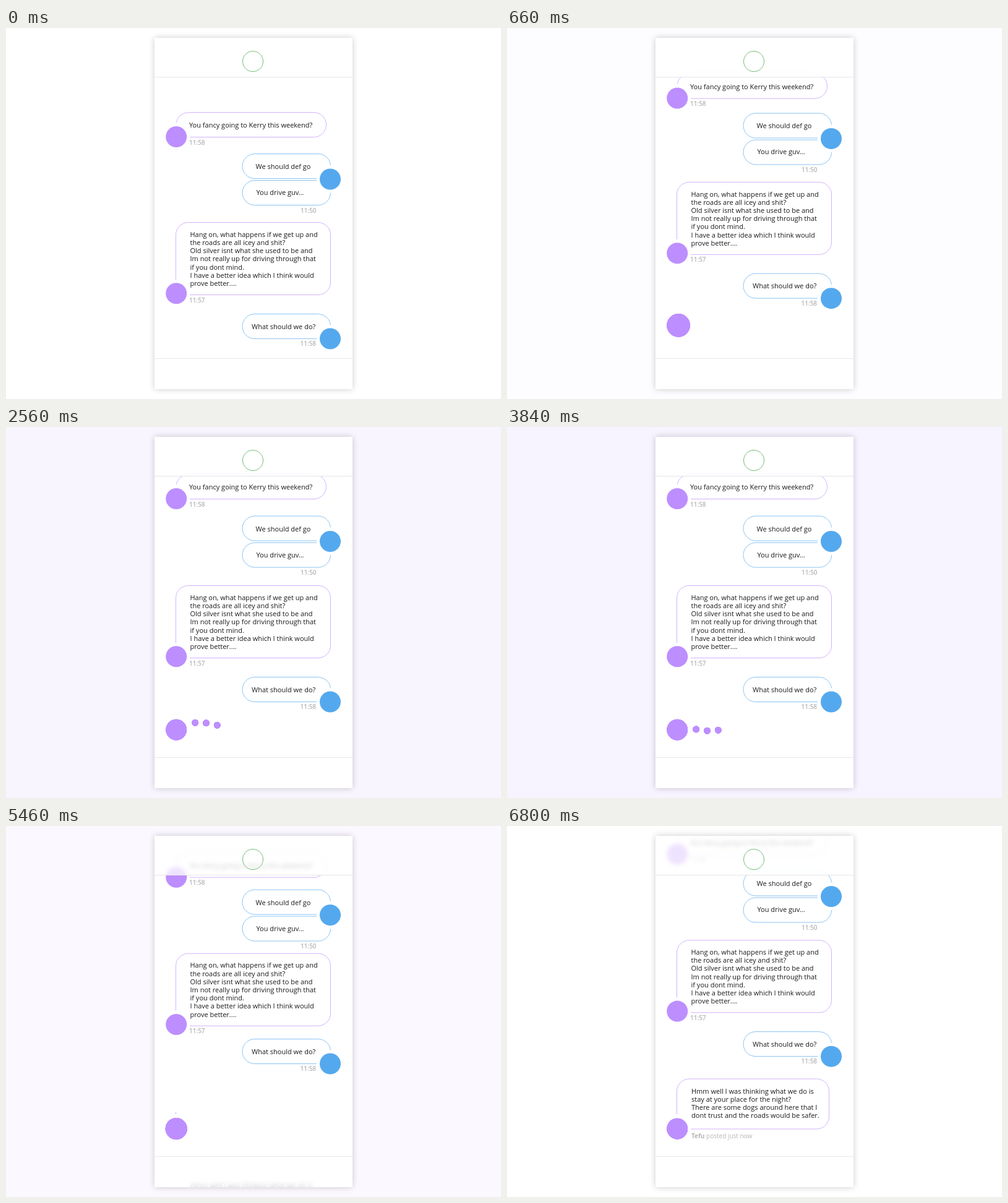
An HTML page for the animation above (6920 ms loop, 800 px wide and 600 px high).

```html
<!DOCTYPE html>
<html lang="en">
<head>
<meta charset="utf-8">
<title>Chat typing indicator</title>
<style>
  html, body { margin: 0; width: 100%; height: 100%; overflow: hidden; background: #fff; }
  .card {
    position: absolute; left: 240px; top: 16px; width: 320px; height: 568px;
    overflow: hidden; background: #fff;
  }
  .shadow {
    position: absolute; left: 240px; top: 16px; width: 320px; height: 568px;
    box-shadow: 0 0 10px rgba(0, 0, 0, .2);
  }
  svg { position: absolute; left: -240px; top: -16px; }
  .bar {
    position: absolute; left: 0; width: 320px; box-sizing: border-box;
    background: rgba(255, 255, 255, .75); backdrop-filter: blur(3.5px);
  }
  .head { top: 0; height: 64px; border-bottom: 1px solid #e6e6e6; }
  .foot { top: 518px; height: 50px; border-top: 1px solid #e6e6e6; }
  .badge {
    position: absolute; left: 142px; top: 21px; width: 34px; height: 34px;
    box-sizing: border-box; border: 1px solid #72bd75; border-radius: 50%;
  }
  text { font: 11px "Open Sans", "Noto Sans", sans-serif; fill: #1a1a1a; }
  .time { font-size: 10px; font-weight: 600; fill: #b5b5b5; }
  .note { font-size: 10px; fill: #b5b5b5; }
  .note tspan { font-weight: 700; }
  path { fill: none; stroke-width: .68; }
  .her path { stroke: #bd8eff; }
  .him path { stroke: #54a9ee; }
  .her circle { fill: #bd8eff; }
  .him circle { fill: #54a9ee; }
</style>
</head>
<body>
<div class="shadow"></div>
<div class="card">
  <svg width="800" height="600" viewBox="0 0 800 600">
    <defs>
      <filter id="goo" filterUnits="userSpaceOnUse" x="240" y="400" width="160" height="200" color-interpolation-filters="sRGB">
        <feGaussianBlur stdDeviation="2"/>
        <feColorMatrix values="1 0 0 0 0  0 1 0 0 0  0 0 1 0 0  0 0 0 18 -7"/>
      </filter>
    </defs>

    <g class="msg her">
      <path d="M275.3 153A20 20 0 0 1 295 136.5H497.5a20 20 0 0 1 0 40H297"/>
      <circle cx="275.2" cy="176" r="17"/>
      <text x="296" y="161">You fancy going to Kerry this weekend?</text>
      <text class="time" x="296" y="188.6">11:58</text>
    </g>

    <g class="msg him">
      <path d="M524.4 222A20 20 0 0 0 504.5 203.5H402a20 20 0 0 0 0 40H502"/>
      <path d="M502 246.5H402a20 20 0 0 0 0 40H504.5a20 20 0 0 0 20 -20"/>
      <circle cx="524" cy="244.5" r="17"/>
      <text x="403.5" y="228">We should def go</text>
      <text x="404.5" y="270">You drive guv...</text>
      <text class="time" x="476" y="298.8">11:50</text>
    </g>

    <g class="msg her">
      <path d="M274.5 407V334.5a20 20 0 0 1 20 -20H504.5a20 20 0 0 1 20 20V411.5a20 20 0 0 1 -20 20H297"/>
      <circle cx="275.2" cy="429.3" r="17"/>
      <text y="337.7">
        <tspan x="297.5">Hang on, what happens if we get up and</tspan>
        <tspan x="297.5" dy="13.2">the roads are all icey and shit?</tspan>
        <tspan x="297.5" dy="13.2">Old silver isnt what she used to be and</tspan>
        <tspan x="297.5" dy="13.2">Im not really up for driving through that</tspan>
        <tspan x="297.5" dy="13.2">if you dont mind.</tspan>
        <tspan x="297.5" dy="13.2">I have a better idea which I think would</tspan>
        <tspan x="297.5" dy="13.2">prove better....</tspan>
      </text>
      <text class="time" x="296" y="443.6">11:57</text>
    </g>

    <g class="msg him">
      <path d="M524.4 480.5A20 20 0 0 0 504.5 462.5H402a20 20 0 0 0 0 40H502"/>
      <circle cx="524" cy="502.5" r="17"/>
      <text x="397" y="486.5">What should we do?</text>
      <text class="time" x="475.5" y="514">11:58</text>
    </g>

    <g class="her">
      <path id="outline" pathLength="1" d="M274.5 466V429a20 20 0 0 1 20 -20H500.5a20 20 0 0 1 20 20V470a20 20 0 0 1 -20 20H297"/>
      <g filter="url(#goo)">
        <circle id="face"/>
        <circle class="dot"/>
        <circle class="dot"/>
        <circle class="dot"/>
      </g>
      <text id="reply" y="432.8">
        <tspan x="298">Hmm well I was thinking what we do is</tspan>
        <tspan x="298" dy="13.2">stay at your place for the night?</tspan>
        <tspan x="298" dy="13.2">There are some dogs around here that I</tspan>
        <tspan x="298" dy="13.2">dont trust and the roads would be safer.</tspan>
      </text>
      <text id="note" class="note" x="298" y="505.6"><tspan>Tefu</tspan> posted just now</text>
    </g>
  </svg>
  <div class="bar head"></div>
  <div class="bar foot"></div>
  <div class="badge"></div>
</div>

<script>
  const LOOP = 6920;
  const $ = id => document.getElementById(id);
  const msgs = [...document.querySelectorAll('.msg')];
  const dots = [...document.querySelectorAll('.dot')];
  const firstLift = [60, 59.5, 58, 58];
  const totalLift = [131, 131, 130, 130];

  const clamp = v => Math.min(1, Math.max(0, v));
  const ramp = (t, a, b) => clamp((t - a) / (b - a));
  const smooth = p => p * p * (3 - 2 * p);
  const bump = (t, mid, width) => Math.exp(-(((t - mid) / width) ** 2) / 2);

  // Step response of a damped spring released at `start`, speed in rad/s
  function spring(t, start, speed, damp = 0.54) {
    const s = (t - start) / 1000;
    if (s <= 0) return 0;
    const w = speed * Math.sqrt(1 - damp * damp);
    const k = damp * speed;
    return 1 - Math.exp(-k * s) * (Math.cos(w * s) + k / w * Math.sin(w * s));
  }

  const shift = (el, y) => el.setAttribute('transform', `translate(0 ${y.toFixed(2)})`);

  function circle(el, x, y, r) {
    el.setAttribute('cx', x.toFixed(2));
    el.setAttribute('cy', y.toFixed(2));
    el.setAttribute('r', Math.max(0, r).toFixed(2));
  }

  function drawBackground(t) {
    const p = 1 - Math.abs(t - LOOP / 2) / (LOOP / 2);
    document.body.style.background =
      `rgb(${Math.round(255 - 9.5 * p)}, ${Math.round(255 - 13.5 * p)}, 255)`;
  }

  // The lowest message leads, the ones above follow
  function drawMessages(t) {
    msgs.forEach((el, i) => {
      const n = 3 - i;
      const a = spring(t, 140 + 12 * n * n, 6.6) * firstLift[i];
      const b = spring(t, 5105 + 60 * n - 5 * n * n, 5.7) * (totalLift[i] - firstLift[i]);
      shift(el, -a - b);
    });
  }

  function drawFace(t) {
    const s = spring(t, 175, 6.6);
    const swell = 1.3 * bump(t, 1100, 120) + 2.6 * bump(t, 5320, 85);
    circle($('face'), 258.2 + 17 * s, 489.6 + 78 * (1 - s), 16.9 * s + swell * clamp(s));
  }

  function drawDots(t) {
    const out = spring(t, 1000, 7, 0.7);
    const bobbing = smooth(ramp(t, 1100, 1500)) * (1 - smooth(ramp(t, 4340, 4850)));
    const gather = ramp(t, 5030, 5270);
    const front = gather > 0 ? 66 * (1 - gather) : Infinity;
    dots.forEach((el, i) => {
      const reach = (30.5 + 17.8 * i) * out;
      const phase = 2 * Math.PI * (t - 2528 - 92 * i) / 800;
      const bob = 484.7 - 6.6 * Math.cos(phase);
      const y = 489 + (bob - 489) * bobbing;
      const r = out > 0 ? 5.7 + 8.3 * (1 - clamp(out)) + 0.8 * clamp(gather * 4) : 0;
      circle(el, 275.2 + Math.min(reach, front), y, r);
    });
  }

  function drawReply(t) {
    const drawn = smooth(ramp(t, 5425, 6200));
    const line = $('outline');
    line.style.display = drawn > 0 ? '' : 'none';
    line.style.strokeDasharray = `${drawn.toFixed(4)} 2`;
    shift($('reply'), 168 * (1 - spring(t, 5380, 6, 0.75)));
    shift($('note'), 110 * (1 - spring(t, 5560, 6, 0.75)));
  }

  function frame() {
    const t = performance.now() % LOOP;
    drawBackground(t);
    drawMessages(t);
    drawFace(t);
    drawDots(t);
    drawReply(t);
    requestAnimationFrame(frame);
  }
  frame();
</script>
</body>
</html>
```
